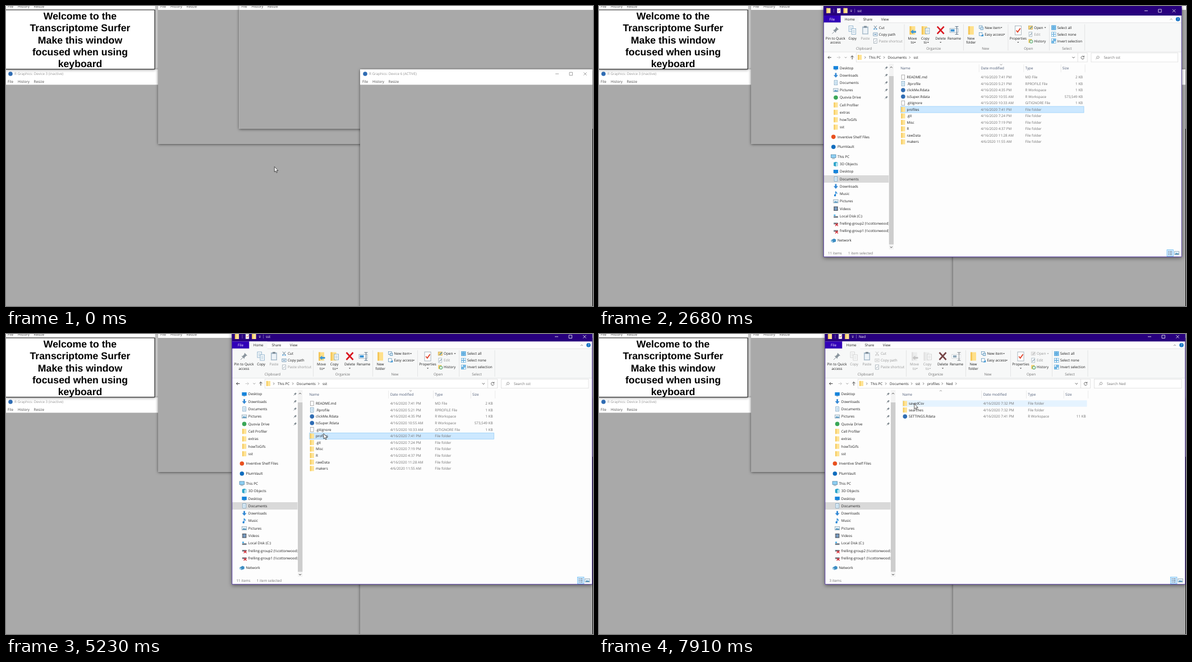
An HTML page that plays this animation: 1046x535 px, repeating every 8000 ms.

```html
<!DOCTYPE html>
<html lang="en">
<head>
<meta charset="utf-8">
<title>Profile folders</title>
<style>
html, body { margin: 0; width: 100%; height: 100%; overflow: hidden; background: #a9a9a9; }
svg { display: block; width: 1046px; height: 535px; }
text { font: 6.3px "Open Sans", "Noto Sans", sans-serif; fill: #1c1c1c; text-rendering: geometricPrecision; white-space: pre; }
.mid { text-anchor: middle; }
.end { text-anchor: end; }
.dim { fill: #6f6f6f; }
.pale { fill: #929292; }
.inv { fill: #fff; }
.menu { fill: #444; }
.head { fill: #4c5a75; }
.big { font: bold 17.7px "Liberation Sans", Arial, sans-serif; fill: #000; text-anchor: middle; }
.shade { filter: drop-shadow(0 1px 2.5px rgba(0, 0, 0, .55)); }
.deep { filter: drop-shadow(0 2px 3.5px rgba(0, 0, 0, .5)); }
.off .act { opacity: .45; filter: grayscale(1); }
.off .cross { filter: grayscale(.8) brightness(1.25); }
</style>
</head>
<body>
<svg id="stage" viewBox="0 0 1046 535"></svg>
<script>
const T = (x, y, s, cls = '') => `<text x="${x}" y="${y + 2.2}" class="${cls}">${s}</text>`;
const R = (x, y, w, h, fill, more = '') => `<rect x="${x}" y="${y}" width="${w}" height="${h}" fill="${fill}" ${more}/>`;
const L = (d, stroke, w = 0.8) => `<path d="${d}" fill="none" stroke="${stroke}" stroke-width="${w}"/>`;
const F = (d, fill) => `<path d="${d}" fill="${fill}"/>`;
const at = (x, y, s, cls = '') => `<g transform="translate(${x} ${y})" class="${cls}">${s}</g>`;
const edge = (c, w = 0.7) => `stroke="${c}" stroke-width="${w}"`;
const dot = c => `<circle r="3.8" fill="${c}"/>`;
const sheet = (c = '#8d8d8d') => R(-2.8, -4, 5.6, 8, '#fff', edge(c));
const lines = c => L('M-1.5 -1.8H1.6M-1.5 0H1.6M-1.5 1.8H1.6', c, .6);
const redX = L('M-1 0L4 4.4M4 0L-1 4.4', '#d3222b', 1.3);

const icon = {
  folder: R(-3.6, -4.5, 7.2, 9, '#ffe394') + R(-3.6, -4.5, 2.2, 9, '#f5cb60'),
  doc: sheet(),
  note: sheet('#5c93b8') + lines('#4a9bd0'),
  rdata: dot('#2f6cb3'),
  desk: R(-4.2, -3.2, 8.4, 6, '#1684db') + L('M-2 3.6H2', '#5b7f9c'),
  down: F('M-1.4 -4.2H1.4V-.4H4L0 4.2 -4 -.4H-1.4Z', '#3388d4'),
  pic: R(-4.2, -2.9, 8.4, 5.8, '#e4f0f8', edge('#8299a8')) + F('M-3.6 2.5L-1 -.5 1 1 2.5 0 3.7 2.5Z', '#4f92bb'),
  drive: dot('#3aa757'),
  cloud: dot('#e8501e'),
  vault: dot('#0f6cbd'),
  pc: R(-4.3, -3.6, 8.6, 5.6, '#8fd0f3', edge('#427a9d')) + L('M-2.5 3.6H2.5', '#58788c'),
  cube: F('M-3.8 -3L0 -4.2 3.8 -3V3L0 4.3 -3.8 3Z', '#2aa3c9') + F('M0 -2L3.8 -3V3L0 4.3Z', '#b5e3f0'),
  music: L('M-.4 2.4V-3.8Q2.2 -2.6 2 .2', '#2084d6', 1.1) + F('M-2.9 2.6a1.6 1.4 0 1 0 3 0a1.6 1.4 0 1 0 -3 0', '#2084d6'),
  video: R(-3.8, -3.8, 7.6, 7.6, '#3d4550') + R(-2.1, -2.8, 4.2, 5.6, '#7aa0c8') + L('M-3.1 -3V3M3.1 -3V3', '#ddd', .5),
  disk: R(-3.8, .2, 7.8, 2.8, '#6e7a84') + R(-3.6, -2.6, 3, 2.2, '#35a5e5'),
  net: R(-3.8, -1.4, 7.6, 3, '#75818b') + redX,
  lan: F('M-4.2 -.6L1 -3.6 4.3 -2V2L-1 3.8 -4.2 2Z', '#3b8cc2') + F('M-4.2 -.6L-1 .8V3.8L-4.2 2Z', '#9ecbe4')
};

// Background device windows
function device(x, y, w, h, title) {
  return R(x, y, w, h, '#fff', 'class="shade"') + R(x, y + 27.4, w, h - 27.4, '#a9a9a9') +
    at(x + 9, y + 8, dot('#2f6cb3')) + T(x + 16, y + 8, title, 'pale') +
    T(x + 4, y + 21.6, 'File', 'menu') + T(x + 22, y + 21.6, 'History', 'menu') + T(x + 50.5, y + 21.6, 'Resize', 'menu');
}
const buttons = (x, y, c) => at(x, y, L('M-3 0H3M22 -2.7H27.4V2.7H22ZM47.3 -2.7L52.7 2.7M52.7 -2.7L47.3 2.7', c, .8));

const greeting = ['Welcome to the', 'Transcriptome Surfer', 'Make this window', 'focused when using', 'keyboard'];
const desktop = R(0, 0, 1046, 535, '#a9a9a9') + R(262, 0, 12, 113, '#efefef') +
  device(-1, 113, 632, 430, 'R Graphics: Device 3 (inactive)') +
  device(-1, -20.5, 267, 133, '') + R(-1, 6.9, 266, 105.7, '#fff', edge('#111', 1)) +
  greeting.map((s, i) => `<text x="132" y="${24.3 + i * 21.15}" class="big">${s}</text>`).join('') +
  device(271, -20.5, 780, 266.4, '') + device(415.5, -20.5, 640, 239.5, '') +
  device(631, 113, 414, 430, 'R Graphics: Device 6 (ACTIVE)') + buttons(982, 121, '#8a8a8a') +
  R(1045, 219, 1, 316, '#000');

// Ribbon
const caret = (x, y, c = '#444') => F(`M${x - 1.6} ${y - .8}h3.2l-1.6 1.8Z`, c);
const page = (x, y, c) => R(x, y, 7.5, 10, '#fff', edge(c, .8)) + L(`M${x + 1.5} ${y + 3}h4.5m-4.5 2h4.5m-4.5 2h4.5`, c, .6);
const bigFolder = R(-5, -7.5, 10, 15, '#ffe08a') + R(-5, -7.5, 3, 15, '#f5c75a');
const label = (x, s, s2, cls = '') => T(x, 54, s, 'mid ' + cls) + (s2 ? T(x, 61.3, s2, 'mid ' + cls) : '');
const small = (x, y, pic, s, cls = '') => at(x, y, pic) + T(x + 6.4, y, s, cls);
const act = s => `<g class="act">${s}</g>`;
const squares = (a, b) => [0, 1, 2, 3].map(i => R(-3.8 + (i % 2) * 4.2, -3.8 + (i >> 1) * 4.2, 3.4, 3.4, i % 3 ? b : a, edge('#3b97d3', .6))).join('');
const blueArrow = F('M-5 0L0 -4V-1.6H5V1.6H0V4Z', '#3e97d6');

const ribbon = `<g id="ribbon">` +
  at(424, 40, F('M1 -6.5L6 -1.5 3.8 -1 .8 2.2 .8 4.6 -4.6 -.8 -2.2 -.8 .6 -3.8Z', '#8a959e') + L('M-2 2L-6 6', '#8a959e', 1)) +
  label(424, 'Pin to Quick', 'access') +
  act(at(454.5, 40, page(-6.5, -8, '#7aa4c2') + page(-1.5, -3, '#7aa4c2')) + label(454.5, 'Copy')) +
  at(477.5, 40, R(-5.5, -7, 11, 14, '#a9bccb') + R(-4, -4.5, 8, 10, '#edf3f8') + R(-2.5, -8, 5, 3, '#7f8e9a')) + label(477.5, 'Paste', '', 'pale') +
  act(small(495.5, 35, L('M-2.5 -3.5L2 2M2.5 -3.5L-2 2', '#5a7488', .9) + L('M-3 2.6h2M1 2.6h2', '#2b8bd2', 1.6), 'Cut') +
    small(495.5, 47, R(-3.6, -2.6, 7.2, 5.2, '#fff', edge('#4d7ea3')) + L('M-2 0H2', '#2b6ea3', 1.1), 'Copy path')) +
  small(495.5, 59, sheet('#8b9aa5') + L('M-1.5 2L1.5 -1', '#8b9aa5', 1), 'Paste shortcut', 'pale') +
  act(at(562, 40, bigFolder + at(1.5, 2.5, blueArrow)) + label(562, 'Move', 'to') + caret(566.5, 61.5)) +
  act(at(585.5, 40, at(-2, 0, bigFolder) + page(-.5, -4, '#6f9dbd')) + label(585, 'Copy', 'to') + caret(590, 61.5)) +
  at(612.5, 39.5, L('M-6 -6.5L6 6.5M6 -6.5L-6 6.5', '#d9141e', 2.6), 'cross') + label(612.5, 'Delete') + caret(612.5, 61.3) +
  at(637, 40, R(-8, -3.5, 15, 7, '#fff', edge('#7c97aa')) + R(-6.5, -2, 7, 4, '#3a93d4') + L('M1.5 -7h6M1.5 7h6M4.5 -7V7', '#48637a', .9), 'cross') + label(637, 'Rename') +
  at(667, 40, bigFolder) + label(667, 'New', 'folder') +
  small(685.2, 35, R(-3.6, -3.5, 5.5, 5, '#fff', edge('#4a86b0')) + R(-1, -.8, 4.6, 4.4, '#cfe4f2', edge('#4a86b0')), 'New item') + caret(721.5, 35) +
  small(685.2, 47, R(-3.6, -3.2, 5.5, 5.6, '#fff', edge('#4a86b0')) + F('M-1 3.5L4 -.5V3.5Z', '#3a93d4'), 'Easy access') + caret(726.5, 47) +
  at(751.5, 40, R(-5.5, -8, 11, 16, '#fff', edge('#8897a3')) + L('M-3.3 0L-.8 3 4 -3.8', '#e0442c', 1.9)) + label(751.5, 'Properties') + caret(751.5, 61.3) +
  act(small(773.7, 35, R(-3.5, -3, 7, 6, '#f7d57c', edge('#c79f43')) + L('M-1 2L3 -2', '#2b83c6', 1.2), 'Open') + caret(800, 35)) +
  small(773.7, 47, sheet('#90a5b3') + L('M-1.5 2L2.5 -2', '#90a5b3', 1.2), 'Edit', 'pale') +
  small(773.7, 59, R(-3.6, -3.6, 6, 7, '#f5cf6d') + `<circle cx="1.3" cy="1" r="2.8" fill="#d9f0de" ${edge('#3c9656', .9)}/>`, 'History') +
  small(815.3, 35, squares('#7cc0ec', '#7cc0ec'), 'Select all') +
  small(815.3, 47, squares('#fff', '#fff'), 'Select none') +
  small(815.3, 59, squares('#fff', '#7cc0ec'), 'Invert selection') +
  [['Clipboard', 475], ['Organize', 600], ['New', 693], ['Open', 770], ['Select', 839]].map(g => T(g[1], 72, g[0], 'mid dim')).join('') +
  [547.5, 653.5, 733.5, 807.5, 871].map(x => L(`M${x} 29V76`, '#dedfe0')).join('') + '</g>';

// Navigation pane: centre y, icon, name, level
const pin = F('M1 -2.8L2.9 -.9 1.2 .3 .6 2 -2 -.6 -.3 -1.2ZM-.8 .8L-2.8 2.8', '#7b858c') + L('M-1 1L-2.7 2.7', '#7b858c', .7);
function branch(y, rows, pins) {
  return rows.map(([k, s], i) => at(424.6, y + i * 13.3, icon[k]) + T(431.8, y + i * 13.3, s) +
    (pins ? i < 5 ? at(515, y + i * 13.3, pin) : '' : '')).join('');
}
const root = (y, k, s) => at(420.4, y, icon[k]) + T(427.6, y, s);
const share = n => ['net', `frelling-group${n} (\\\\cottonwood)`];
const pane = R(403, 300, 116.5, 13.2, '#d9d9d9') + '<g clip-path="url(#side)">' +
  branch(107.2, [['desk', 'Desktop'], ['down', 'Downloads'], ['note', 'Documents'], ['pic', 'Pictures'], ['drive', 'Quovia Drive'],
    ['folder', 'Cell Profiler'], ['folder', 'extras'], ['folder', 'howToGifs'], ['folder', 'sst']], true) +
  root(231, 'cloud', 'Inventive Shelf Files') + root(249, 'vault', 'PlumVault') + root(266.5, 'pc', 'This PC') +
  branch(280, [['cube', '3D Objects'], ['desk', 'Desktop'], ['note', 'Documents'], ['down', 'Downloads'], ['music', 'Music'],
    ['pic', 'Pictures'], ['video', 'Videos'], ['disk', 'Local Disk (C:)'], share(2), share(1)]) +
  root(417, 'lan', 'Network') + '</g>' +
  R(520, 100, 8.3, 333, '#f3f3f3') + R(520, 122, 8.3, 302, '#cdcdcd') +
  L('M522 107.2l2 -2 2 2M522 428l2 2 2 -2', '#444', 1);

// Folder views
const crumbs = [['This PC', 484], ['Documents', 518], ['sst', 564], ['profiles', 585], ['Ned', 618.5]];
const chevron = x => L(`M${x - .8} 86.6l1.9 1.9 -1.9 1.9`, '#555', .8);
const dir = (name, when) => ['folder', name, when, 'File folder', ''];
const d16 = '4/16/2020 ';
const views = {
  sst: { depth: 3, rows: [
    ['doc', 'README.md', d16 + '7:41 PM', 'MD File', '2 KB'],
    ['note', '.Rprofile', d16 + '5:21 PM', 'RPROFILE File', '1 KB'],
    ['rdata', 'clickMe.Rdata', d16 + '4:35 PM', 'R Workspace', '1 KB'],
    ['rdata', 'tsSuper.Rdata', d16 + '10:55 AM', 'R Workspace', '573,549 KB'],
    ['doc', '.gitignore', '4/15/2020 10:33 AM', 'GITIGNORE File', '1 KB'],
    dir('profiles', d16 + '7:41 PM'), dir('.git', d16 + '7:24 PM'), dir('Misc', d16 + '7:19 PM'),
    dir('R', d16 + '4:37 PM'), dir('rawData', d16 + '11:28 AM'), dir('makers', '4/6/2020 11:55 AM')] },
  profiles: { depth: 4, tail: 612, rows: [
    dir('Ned', d16 + '7:41 PM'), dir('neddy', d16 + '1:07 PM'), dir('Ivo_Farwick', d16 + '12:36 PM'), dir('owen darsby', d16 + '11:42 AM'),
    ['rdata', 'SETTINGS.Rdata', d16 + '7:27 PM', 'R Workspace', '11 KB']] },
  Ned: { depth: 5, rows: [
    dir('savedCsv', d16 + '7:32 PM'), dir('searches', d16 + '7:32 PM'),
    ['rdata', 'SETTINGS.Rdata', d16 + '7:41 PM', 'R Workspace', '11 KB']] }
};
const rowY = i => 123.9 + i * 11.6;
const folderView = name => {
  const v = views[name];
  return `<g id="view-${name}">` + T(463, 4.8, name, 'inv') + T(905, 88.5, 'Search ' + name, 'dim') +
    crumbs.slice(0, v.depth).map(([s, x]) => chevron(x - 7) + T(x, 88.5, s)).join('') + (v.tail ? chevron(v.tail) : '') +
    L(name == 'sst' ? 'M719 100.4l2 1.8 2 -1.8' : 'M607 102.2l2 -1.8 2 1.8', '#777', .7) +
    v.rows.map(([k, s, when, type, size], i) => {
      const y = rowY(i);
      return at(545.3, y, icon[k]) + T(552, y, s) + T(684.7, y, when, 'dim') + T(764.3, y, type, 'dim') + T(867.5, y, size, 'end dim');
    }).join('') + '</g>';
};

const frame = R(402.5, -6, 642.5, 452.6, '#fdfdfd', 'class="deep"') + R(402.5, -6, 642.5, 19.3, '#28007d') +
  at(411.5, 4.5, icon.folder) + L('M421 1V8M458.5 1V8', '#8d7bc0', .7) + at(430, 4.5, sheet('#ddd') + L('M-1.5 0L-.3 1.5 2 -1.8', '#e0442c', .9)) +
  at(442, 4.5, icon.folder) + L('M450.5 3.6h3.4', '#ddd', .7) + caret(452.2, 6, '#ddd') + buttons(981, 4.8, '#fff') +
  R(402.5, 13.3, 31, 13, '#3100b8') + T(418, 20, 'File', 'mid inv') +
  R(403, 26, 641.5, 52.7, '#f7f8f8') + L('M403 26.2H433.5M465.5 26.2H1044.5M403 78.7H1044.5', '#dfe0e1') + R(433.5, 13.3, 32, 13.2, '#f7f8f8') +
  T(449.7, 20, 'Home', 'mid') + T(482, 20, 'Share', 'mid') + T(512.7, 20, 'View', 'mid') +
  L('M1024 21l2 -2 2 2', '#777') + at(1038, 19.8, dot('#1272c4')) + T(1038, 19.8, '?', 'mid inv') +
  L('M416.5 88.5H410.5M413 86L410.5 88.5 413 91', '#333', .9) + L('M426.5 88.5H432.5M430 86L432.5 88.5 430 91', '#c3c3c3', .9) +
  L('M440.6 87.6l1.8 1.8 1.8 -1.8', '#777') + L('M454 92V85.5M451.3 88.2L454 85.5 456.7 88.2', '#333', .9) +
  R(461.5, 80.5, 414, 16.2, '#fff', edge('#d9d9d9')) + L('M858.5 80.5V96.7', '#d9d9d9') + at(467.5, 88.3, icon.folder) +
  L('M848.6 87.5l2.2 2.2 2.2 -2.2', '#444', .9) + L('M869.3 87.2a2.7 2.7 0 1 0 .5 2M869.8 85.4v2.2h-2.2', '#444', .8) +
  R(882.5, 80.5, 155.5, 16.2, '#fff', edge('#d9d9d9')) + L('M891 91.5l2 -2a2.1 2.1 0 1 1 .3 .3', '#777', .8) +
  [['Name', 540.5], ['Date modified', 684.7], ['Type', 764.3], ['Size', 831]].map(c => T(c[1], 107.6, c[0], 'head')).join('') +
  [681.5, 761.5, 828.3, 871.5].map(x => L(`M${x} 101V115`, '#e6e6e6')).join('');

const status = T(410.5, 439.7, '', 'dim').replace('<text', '<text id="count"') +
  T(446.8, 439.7, '1 item selected', 'dim').replace('<text', '<text id="picked"') +
  R(1018.3, 433.6, 11.6, 11.8, '#cce8ff', edge('#5fb4ee')) + at(1024, 439.5, L('M-3.5 -2.8H-1.5M-.5 -2.8H3.5M-3.5 0H-1.5M-.5 0H3.5M-3.5 2.8H-1.5M-.5 2.8H3.5', '#456', .8)) +
  at(1036, 439.5, icon.pic);

const stage = document.getElementById('stage');
stage.innerHTML = '<clipPath id="side"><rect x="403" y="98" width="116.5" height="335"/></clipPath>' + desktop +
  '<g id="explorer">' + frame + ribbon + pane +
  R(540.5, 0, 329, 11.4, '#e5f3ff', 'id="hover"') + R(540.8, 0, 328.6, 11.2, '#cce8ff', 'id="sel" ' + edge('#8fcbf8')) +
  Object.keys(views).map(folderView).join('') + `<g id="tail">${chevron(636)}</g>` + status +
  L('M402.8 0V446.3H1044.7V0', '#3a1d8f', .9) + '</g>' +
  `<path id="cursor" d="M0 0V9.4L2.1 7.5 3.6 10.9 5.1 10.3 3.7 7H6.6Z" fill="#fff" stroke="#111" stroke-width=".7"/>`;
const $ = id => document.getElementById(id);
const show = (el, on) => el.style.display = on ? '' : 'none';

// Each step changes only the values it names
const steps = [
  [0, { cur: [478.3, 286.5], win: '', alpha: 0, view: 'sst', hover: -1, sel: 5, count: 11, ribbon: 1, tail: 0 }],
  [530, { cur: [430, 294] }], [660, { cur: [363.5, 307] }], [800, { cur: [322, 319] }], [920, { cur: [278.5, 335] }],
  [1070, { cur: [120.5, 470] }], [1500, { cur: [110, 483] }], [1630, { cur: [97.5, 496] }], [1780, { cur: [86.5, 515] }], [1940, { cur: null }],
  [2530, { alpha: .25, win: 'translate(-3.8 109.3) scale(.838 .8405)' }],
  [2680, { alpha: 1, win: 'translate(0 3.8) scale(.9938)' }], [2800, { win: '' }],
  [3390, { cur: [181.5, 507] }], [3510, { cur: [330, 400] }], [3630, { cur: [500, 231.5] }], [3750, { cur: [549, 251] }],
  [3900, { cur: [470, 330] }], [4020, { cur: [406.5, 388] }], [4150, { cur: [558.5, 351] }], [4300, { cur: [570, 265.5] }],
  [4450, { cur: [573, 225], hover: 9 }], [4570, { cur: [572.3, 200.5], hover: 7 }], [4690, { cur: [571, 197], hover: 6 }],
  [4810, { cur: [568, 191] }], [4930, { cur: [564, 189] }], [5080, { cur: [561.5, 182], hover: -1 }], [5230, { cur: [566, 177.5] }],
  [5510, { view: 'profiles', sel: -1, cur: [566.5, 181.5] }], [5660, { ribbon: 0 }], [5780, { count: 5 }],
  [6160, { cur: [566.5, 173.8] }], [6310, { cur: [565.5, 160], hover: 3 }], [6430, { cur: [563, 141], hover: 1 }],
  [6560, { cur: [561.3, 125.5], hover: 0 }], [6710, { cur: [561.8, 124.3] }],
  [7270, { sel: 0 }], [7420, { view: 'Ned', sel: -1 }], [7540, { count: 3 }], [7910, { tail: 1 }]
];

function render(t) {
  const s = Object.assign({}, ...steps.filter(k => k[0] <= t).map(k => k[1]));
  show($('explorer'), s.alpha);
  $('explorer').setAttribute('opacity', s.alpha);
  $('explorer').setAttribute('transform', s.win);
  for (const name in views) show($('view-' + name), name == s.view);
  for (const id of ['hover', 'sel']) {
    show($(id), s[id] >= 0);
    $(id).setAttribute('y', rowY(s[id]) - 5.6);
  }
  $('count').textContent = s.count + ' items';
  show($('picked'), s.sel >= 0 || s.view == 'profiles' && s.count == 11);
  $('ribbon').setAttribute('class', s.ribbon ? '' : 'off');
  show($('tail'), s.tail);
  show($('cursor'), s.cur);
  if (s.cur) $('cursor').setAttribute('transform', `translate(${s.cur})`);
}

const start = performance.now();
(function tick() {
  render((performance.now() - start) % 8000);
  requestAnimationFrame(tick);
})();
</script>
</body>
</html>
```
